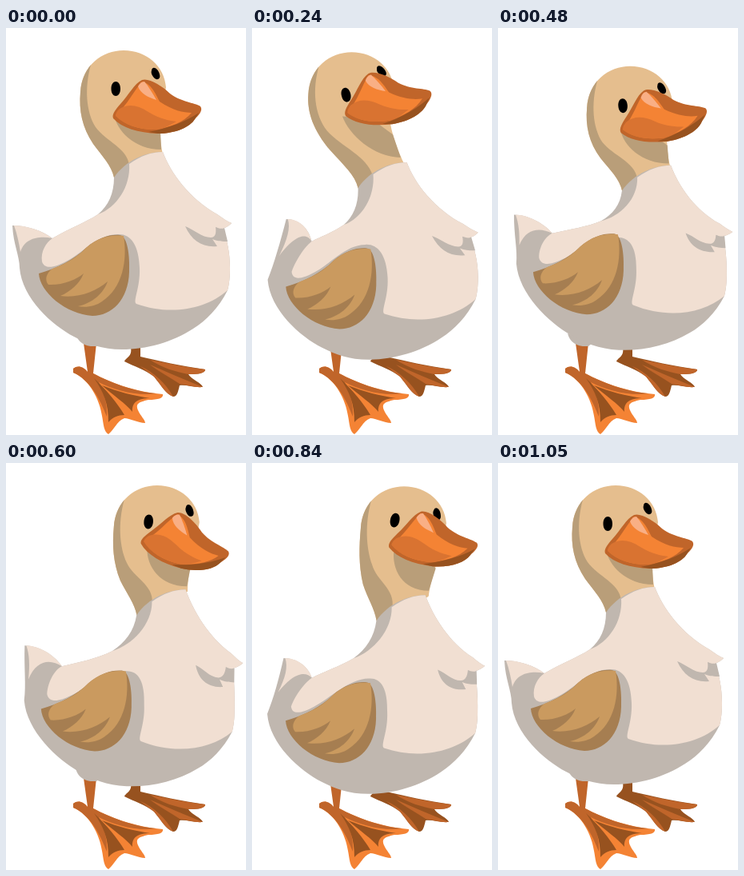
Animation of 300x509 px, one loop 1.08 s. Source, as an HTML page:

```html
<!DOCTYPE html>
<html lang="en">
<head>
<meta charset="utf-8">
<title>Duck</title>
<style>
html, body { margin: 0; width: 100%; height: 100%; overflow: hidden; background: #fff; }
svg { display: block; width: 100%; height: 100%; }
</style>
</head>
<body>
<svg id="stage" viewBox="0 0 300 509"></svg>
<script>
const LOOP = 1080, STEP = 30, CYCLE = 1050;
const tan = '#e5be8e', tanDark = '#b99e79', cream = '#f1dfd2', gray = '#c0b7af',
  wing = '#ca9a5f', wingDark = '#a67e51',
  orange = '#f48334', orangeMid = '#d97331', rust = '#c0652a', brown = '#97521f', glow = '#f9af85';

const stage = document.getElementById('stage');
const moving = [];

function draw(fill, d, warp) {
  const path = document.createElementNS('http://www.w3.org/2000/svg', 'path');
  path.setAttribute('fill', fill);
  path.setAttribute('d', d);
  stage.append(path);
  if (warp) moving.push({ path, d, warp });
}

const mix = (a, b, w) => a.map((v, i) => v + (b[i] - v) * w);
function smooth(from, to, v) {
  const w = Math.min(1, Math.max(0, (v - from) / (to - from)));
  return w * w * (3 - 2 * w);
}
function turn(x, y, cx, cy, angle) {
  const c = Math.cos(angle), s = Math.sin(angle);
  return [cx + (x - cx) * c - (y - cy) * s, cy + (x - cx) * s + (y - cy) * c];
}
const add = (p, q) => [p[0] + q[0], p[1] + q[1]];

// The head sways once per cycle while the body bobs twice.
function poseAt(t) {
  const a = 2 * Math.PI * t / CYCLE;
  const s1 = Math.sin(a), s2 = Math.sin(2 * a);
  const sway = 1 - Math.cos(a), bob = 1 - Math.cos(2 * a);
  const headX = 14 * sway - 35 * s1;
  return {
    head: [headX, 6.5 * sway + 5.3 * s1 - 2.8 * bob - 11.6 * s2],
    eyeTilt: -0.23 * s1,
    beak: [0.9 * headX, 4 * sway - 5.9 * bob - 7.9 * s2],
    beakTilt: 0.18 * s2 - 0.2 * s1,
    collar: [12 * sway - 13 * s1, 5.5 * sway + 4.3 * s1 + 3.1 * bob - 8.3 * s2],
    tail: [5 * sway + 15.5 * bob, -8 * sway - 4.4 * s2],
    belly: [3 * sway, 6.5 * bob],
    roll: (7 * sway - 5 * bob) / 265,
    wing: [1.5 * sway, 9 * bob - 1.5 * sway]
  };
}

// Each warp moves a point of the rest drawing into the current pose.
const headWarp = (x, y, p) => add([x, y], mix(p.head, p.collar, smooth(100, 180, y)));
const eyeWarp = (x, y, p) => add(turn(x, y, 162, 66, p.eyeTilt), p.head);
const beakWarp = (x, y, p) => add(turn(x, y, 183, 94, p.beakTilt), p.beak);
const wingWarp = (x, y, p) => add([x, y], p.wing);
function bodyWarp(x, y, p) {
  const belly = add(p.belly, [0, p.roll * (x - 150)]);
  const trunk = mix(belly, p.collar, smooth(290, 180, y));
  return add([x, y], mix(trunk, p.tail, smooth(95, 20, x) * smooth(300, 255, y)));
}

// Feet
draw(brown, 'M148,417 C150,412 158,411 156,400 H168 L168,411 C190,416 220,423 249,427 C249,432 240,433 228,433 C232,440 245,444 246,449 C236,450 225,446 217,447 C215,455 214,461 209,461 C200,458 195,448 185,436 C175,428 160,423 148,417Z');
draw(rust, 'M180,415 C205,420 230,425 249,427 C249,432 240,433 228,433 C212,430 195,425 180,415Z M180,421 C200,430 222,439 246,449 C236,450 225,446 217,445 C205,437 190,429 180,421Z M168,423 C185,430 200,445 209,461 C200,458 195,448 185,436Z');
draw(orange, 'M84,426 C90,421 97,424 102,430 L109,432 C130,443 160,455 196,458 C197,463 190,465 178,465 C165,468 162,470 165,478 C168,485 174,490 174,494 C165,494 155,488 148,488 C138,492 135,503 128,508 C122,505 122,495 120,485 C117,465 105,440 84,431Z');
draw(rust, 'M84,426 C90,421 97,424 102,430 L97,394 H113 L109,432 C130,443 160,455 188,457 C165,461 135,453 116,443 C122,455 127,470 126,486 C118,465 105,440 84,431Z');
draw(brown, 'M110,438 C122,455 128,470 128,493 C133,487 140,484 148,484 C140,470 125,452 110,438Z M120,447 C135,460 150,470 158,480 C157,468 165,463 180,463 C160,460 140,455 120,447Z');
draw(gray, 'M87,382 C90,394 100,399 113,398 L125,388Z');

// Head and neck
draw(tan, 'M135,187 C132,172 120,160 109,145 C95,124 91,103 93,80 C95,47 120,28 147,28 C176,28 198,48 200,74 L194,110 C192,120 192,140 196,158 L180,172 L142,195Z', headWarp);
draw(tanDark, 'M135,187 C132,172 120,160 109,145 C95,124 91,103 93,80 C94,65 99,55 106,46 C98,75 100,105 112,124 C125,142 152,150 154,172 L142,195Z', headWarp);
draw(tanDark, 'M135,108 C138,128 160,152 194,152 L193,128 L170,110Z', headWarp);
draw('#000', 'M131.5,76 C131.5,64 143,64 143,76 C143,88 131.5,88 131.5,76Z M182,53 C183,47 190,50 192,58 C194,65 187,66 184,61 C182,58 181,56 182,53Z', eyeWarp);

// Body and tail
const chest = 'M196,155 C206,182 230,214 264,233 C271,238 277,242 282,244 C278,248 274,250 272,250 C276,265 280,280 280,300 C280,312 279,320 277,328 ';
const back = 'C80,250 100,243 115,233 ';
draw(gray, chest + 'C266,350 250,366 234,376 C208,393 175,402 145,402 C120,402 102,395 85,386 C58,372 20,338 17,300 C17,285 9,270 8,247 C25,247 45,253 58,263 ' + back + 'C128,222 135,207 135,187 C150,165 175,155 196,155Z', bodyWarp);
draw(cream, chest + 'C250,352 205,360 163,345 C158,342 168,325 167,300 C166,270 155,257 140,258 C115,258 95,282 75,292 C60,300 48,302 45,292 C43,280 50,268 58,263 ' + back + 'C138,225 156,198 154,170 C168,160 182,155 196,155Z', bodyWarp);
draw(cream, 'M10,247 C25,247 45,253 58,263 C42,260 24,262 18,280 C16,268 14,258 10,247Z', bodyWarp);
draw(gray, 'M224,248 C232,266 246,275 264,273 L258,264 C265,267 271,267 277,267 L273,250 C269,252 265,250 262,249 C263,256 262,262 256,262 C245,262 235,252 224,248Z', bodyWarp);

// Wing
draw(wingDark, 'M41,307 C65,300 85,290 100,275 C115,262 130,258 142,259 C152,260 155,285 154,305 C153,340 132,360 108,360 C75,358 42,330 41,307Z', wingWarp);
draw(wing, 'M58,301 C75,295 90,286 100,275 C115,262 130,258 147,260 C152,290 146,325 120,342 C112,348 100,350 90,348 C108,344 122,332 127,317 C112,330 90,338 68,335 C80,330 92,320 97,307 C88,315 70,322 53,321 C48,315 50,307 58,301Z', wingWarp);

// Beak
draw(rust, 'M134,113 C132,108 137,102 143,95 C154,83 160,70 170,65 C178,62 195,72 205,82 C220,93 235,93 243,98 C247,103 240,110 236,114 C230,124 212,132 190,132 C165,131 145,125 134,113Z', beakWarp);
draw(orange, 'M137,109 C152,96 160,78 170,67 C183,70 188,85 192,92 C208,103 222,106 232,106 C222,118 205,124 187,127 C165,127 148,121 137,109Z', beakWarp);
draw(orangeMid, 'M137,110 C137,106 139,104 142,101 C154,94 165,97 178,105 C192,114 206,116 213,117 C200,124 195,127 187,127 C165,127 148,121 137,110Z', beakWarp);
draw(brown, 'M178,130 C205,125 226,116 241,106 L236,114 C230,124 212,132 190,132Z', beakWarp);
draw(glow, 'M165,73 C167,69 170,67 173,67 C178,73 183,81 188,90 C178,87 168,82 165,73Z', beakWarp);

const start = performance.now();

function frame() {
  const elapsed = (performance.now() - start) % LOOP;
  const pose = poseAt(Math.floor(elapsed / STEP) * STEP);
  for (const { path, d, warp } of moving) {
    path.setAttribute('d', d.replace(/([\d.]+),([\d.]+)/g,
      (_, x, y) => warp(+x, +y, pose).map(v => v.toFixed(2)).join()));
  }
  requestAnimationFrame(frame);
}
frame();
</script>
</body>
</html>
```
